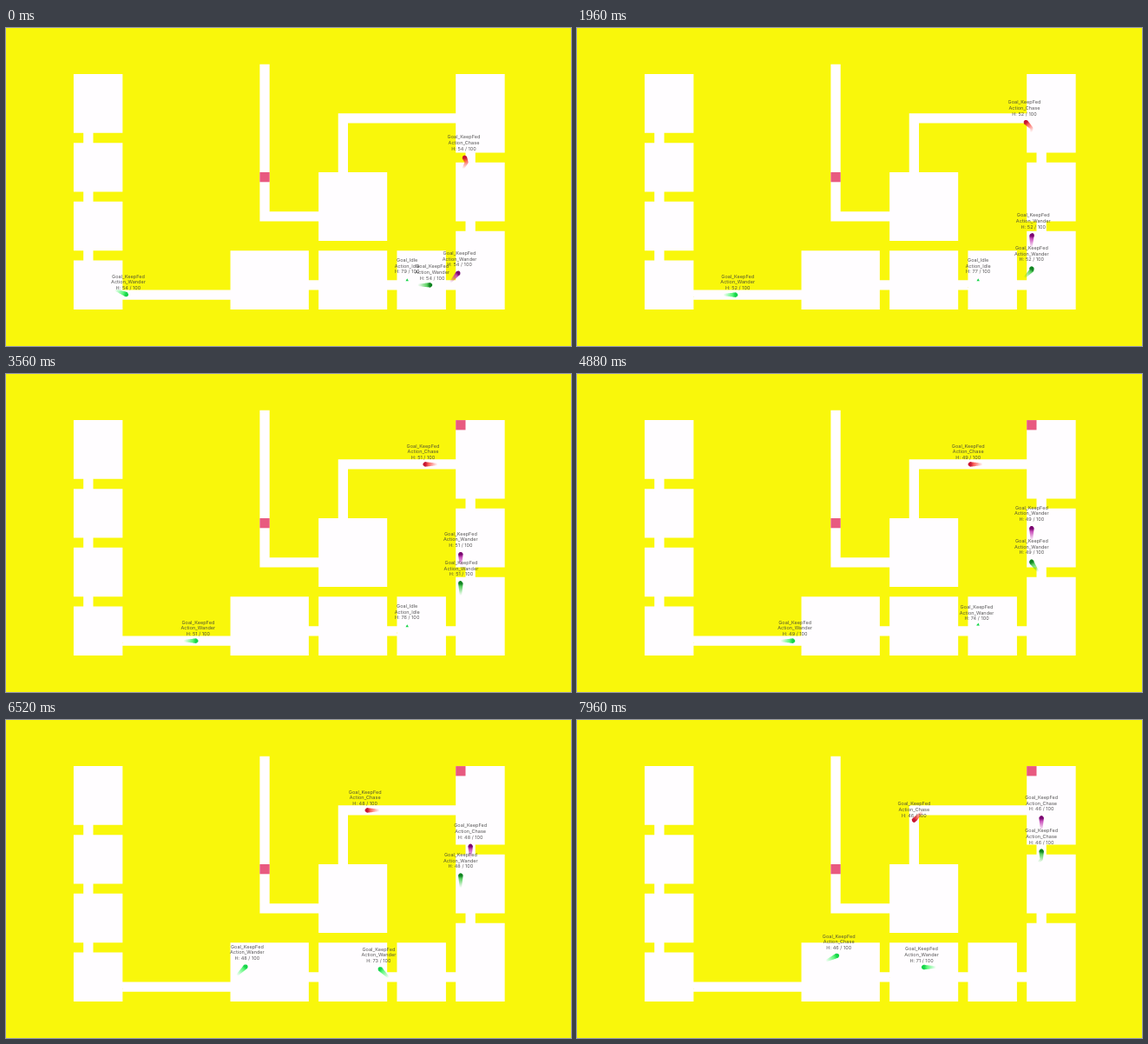
An HTML page that plays this animation: 651x366 px, repeating every 8 s.

```html
<!DOCTYPE html>
<html lang="en">
<head>
<meta charset="utf-8">
<title>Goal agents</title>
<style>
html, body { margin: 0; width: 100%; height: 100%; overflow: hidden; background: #f9f70b; }
svg { display: block; width: 651px; height: 366px; }
text {
  font: 5.5px Inter, "Open Sans", sans-serif; letter-spacing: .04px;
  text-anchor: middle; text-rendering: geometricPrecision; fill: #3a3a3a; fill-opacity: .85;
}
</style>
</head>
<body>
<svg id="stage" viewBox="0 0 651 366"></svg>
<script>
const LOOP = 8000, STEP = 40, TRAIL = 740, PARTS = 14;
const CELL = 11.29, LEFT = 77.9, TOP = 53.1;
const SPEED = 2 / 1000; // cells per ms
const LINE = 6.7;
const stage = document.getElementById('stage');

function add(parent, tag, attrs = {}) {
  const el = document.createElementNS('http://www.w3.org/2000/svg', tag);
  for (const k in attrs) el.setAttribute(k, attrs[k]);
  parent.appendChild(el);
  return el;
}

// Map: one path of cell rectangles
let floor = '';
const rect = (c, r, w, h) =>
  `M${LEFT + c * CELL} ${TOP + r * CELL}h${w * CELL}v${h * CELL}h${-w * CELL}z`;
const room = (...cells) => { floor += rect(...cells); };

// A row or column of rooms, with a door in each wall between them
function wing(c, r, length, depth, walls, door, across) {
  const put = (from, size, side, width) => across
    ? room(c + from, r + side, size, width)
    : room(c + side, r + from, width, size);
  let from = 0;
  for (const wall of [...walls, length]) {
    put(from, wall - from, 0, depth);
    if (wall < length) put(wall, 1, door, 1);
    from = wall + 1;
  }
}

wing(0, 0, 24, 5, [6, 12, 18], 1, false);
wing(39, 0, 24, 5, [8, 15], 1, false);
wing(16, 18, 22, 6, [8, 16], 3, true);
room(25, 10, 7, 7);
room(38, 21, 1, 1);
room(5, 22, 11, 1);
room(27, 4, 12, 1);
room(27, 5, 1, 5);
room(19, -1, 1, 16);
room(20, 14, 5, 1);
add(stage, 'path', { d: floor, fill: '#fffdff' });

const snack = (c, r) => add(stage, 'path', { d: rect(c, r, 1, 1), fill: '#e85a80' });
snack(19, 10);
const newSnack = snack(39, 0), SNACK_AT = 2960;

// Agents walk cell to cell at one speed; lead is the distance covered by t = 0
const north = [[39, 16], [39.7, 15], [39, 14], [39, 10], [40, 9], [40, 3]];
const green = { dark: '#14d548', main: '#28f650' };
const agents = [
  {
    ...green, health: 54, lead: 2.24, moods: [[0, 'KeepFed', 'Wander'], [6720, 'KeepFed', 'Chase']],
    path: [[3, 21.2], [5, 22], [15, 22], [17.4, 19.6], [17.2, 19.75], [20, 18.4]]
  },
  {
    dark: '#c81430', main: '#fa3024', health: 54, lead: 2, moods: [[0, 'KeepFed', 'Chase']],
    path: [[39, 9.6], [39.6, 8.5], [39, 7], [39, 5], [38, 4], [28, 4], [27, 5], [27, 7]]
  },
  {
    dark: '#0f8420', main: '#2cc634', health: 54, lead: 2.1,
    moods: [[0, 'KeepFed', 'Wander'], [7720, 'KeepFed', 'Chase']],
    path: [[34, 21], [37.5, 21], [39, 19.5], ...north]
  },
  {
    dark: '#7a0070', main: '#bb1ca8', health: 54, lead: 1.82,
    moods: [[0, 'KeepFed', 'Wander'], [6040, 'KeepFed', 'Chase']],
    path: [[37.7, 21], [38.9, 19.6], ...north]
  },
  {
    ...green, health: 79, lead: 0, wait: 4800, moods: [[0, 'Idle', 'Idle'], [4800, 'KeepFed', 'Wander']],
    path: [[33.54, 20.35], [32, 21], [31.6, 21], [30.6, 20], [27, 20]]
  }
];

agents.forEach((a, i) => {
  a.fade = add(stage, 'linearGradient', { id: 'fade' + i, gradientUnits: 'userSpaceOnUse' });
  [[0, a.dark, 1], [.2, a.dark, .95], [.38, a.main, .75], [1, a.main, 0]].forEach(([offset, color, alpha]) =>
    add(a.fade, 'stop', { offset, 'stop-color': color, 'stop-opacity': alpha }));
  a.trail = add(stage, 'polygon', { fill: `url(#fade${i})` });
  a.head = add(stage, 'polygon', { points: '0,-1.4 1.7,1.6 -1.7,1.6', fill: a.dark });
});
agents.forEach(a => {
  a.label = add(stage, 'g');
  a.lines = [0, 1, 2].map(i => add(a.label, 'text', { y: -19.4 + i * LINE }));
});

function place({ path, lead, wait = 0 }, t) {
  let left = Math.max(0, lead + SPEED * (t - wait));
  let [c, r] = path[0];
  for (const [nc, nr] of path.slice(1)) {
    const d = Math.hypot(nc - c, nr - r), k = Math.min(1, left / d);
    c += (nc - c) * k;
    r += (nr - r) * k;
    left -= d * k;
    if (k < 1) break;
  }
  return [LEFT + (c + .5) * CELL, TOP + (r + .5) * CELL];
}

function heading(from, to) {
  const dx = to[0] - from[0], dy = to[1] - from[1], d = Math.hypot(dx, dy);
  return d > .01 ? [dx / d, dy / d] : [0, -1];
}

function drawTrail(a, pts) {
  const [x1, y1] = pts[0], [x2, y2] = pts[PARTS];
  const length = Math.hypot(x1 - x2, y1 - y2);
  a.trail.style.display = length > .5 ? '' : 'none';
  const grow = Math.min(1, length / 8);
  const left = [], right = [];
  pts.forEach(([x, y], i) => {
    const [dx, dy] = heading(pts[Math.min(PARTS, i + 1)], pts[Math.max(0, i - 1)]);
    const w = grow * Math.min(1 + 1.2 * i, 3.1 - 2 * i / PARTS);
    left.push([x - dy * w, y + dx * w]);
    right.unshift([x + dy * w, y - dx * w]);
  });
  a.trail.setAttribute('points', [...left, ...right].map(p => p.map(v => v.toFixed(2)).join()).join(' '));
  Object.entries({ x1, y1, x2, y2 }).forEach(([k, v]) => a.fade.setAttribute(k, v));
}

function draw(t) {
  newSnack.style.display = t >= SNACK_AT ? '' : 'none';
  const lost = Math.floor((t + 250) / 1000);
  for (const a of agents) {
    const pts = Array.from({ length: PARTS + 1 }, (_, i) => place(a, t - TRAIL * i / PARTS));
    const [x, y] = pts[0], [dx, dy] = heading(pts[1], pts[0]);
    drawTrail(a, pts);
    const turn = Math.atan2(dx, -dy) * 180 / Math.PI;
    a.head.setAttribute('transform', `translate(${x - dx * 1.2} ${y - dy * 1.2}) rotate(${turn})`);
    a.label.setAttribute('transform', `translate(${x} ${y})`);
    const [, goal, action] = a.moods.filter(m => m[0] <= t).pop();
    ['Goal_' + goal, 'Action_' + action, `H: ${a.health - lost} / 100`]
      .forEach((s, i) => { a.lines[i].textContent = s; });
  }
}

function tick() {
  draw(Math.floor(performance.now() % LOOP / STEP) * STEP);
  requestAnimationFrame(tick);
}
tick();
</script>
</body>
</html>
```
